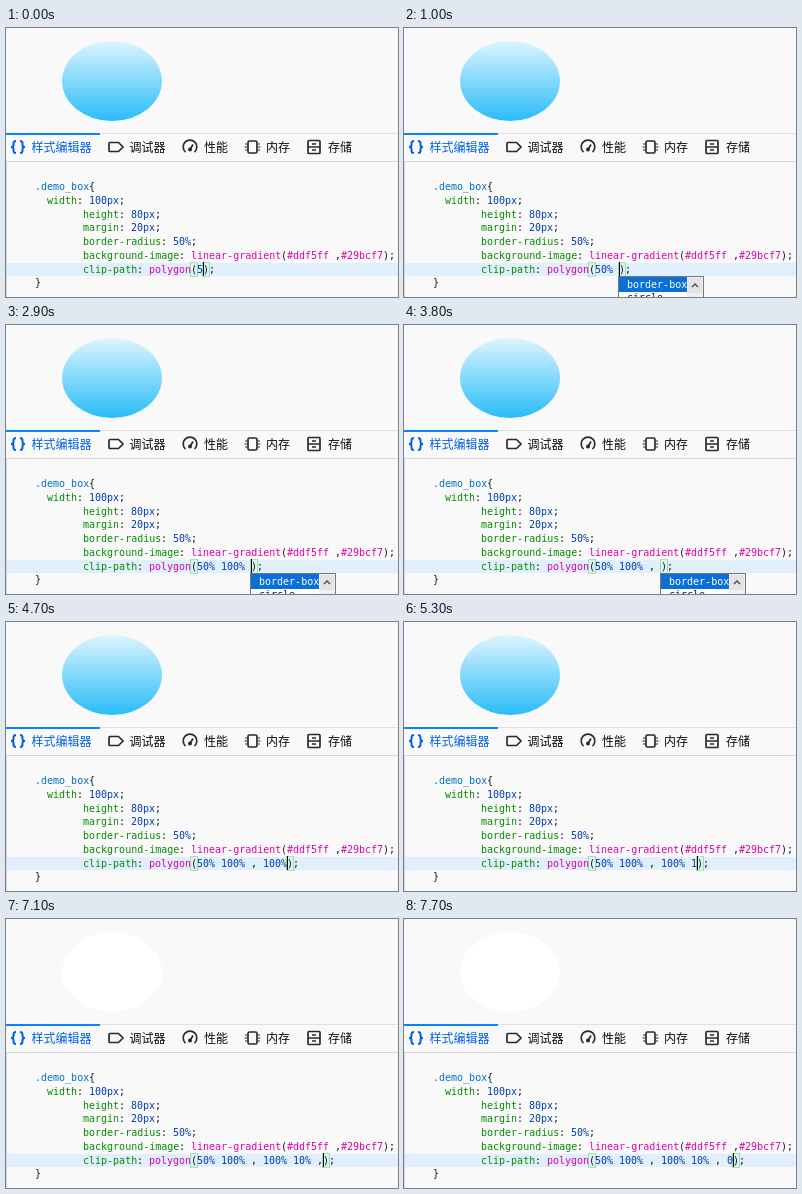
Recreate the animation shown at these times as an HTML page with a canvas. Size 392x269 px, loop 8 s.

```html
<!DOCTYPE html>
<html lang="zh-CN">
<head>
<meta charset="utf-8">
<title>clip-path typing</title>
<style>
html, body { margin: 0; width: 100%; height: 100%; overflow: hidden; background: #f9f9fa; }
canvas { display: block; width: 392px; height: 269px; }
</style>
</head>
<body>
<canvas id="stage" width="392" height="269"></canvas>
<script>
const W = 392, H = 269, LOOP = 8000, CELL = 6, LEFT = 29;
const ctx = document.getElementById('stage').getContext('2d');
const MONO = '10px "DejaVu Sans Mono", monospace';
const UI = '500 12px "Noto Sans CJK SC", "Noto Sans CJK", sans-serif';
const BG = '#f9f9fa', INK = '#18191a', GREEN = '#058b00', PINK = '#dd00a9';
const BLUE = '#0060df', NAVY = '#003eaa', ICON = '#2a2a2e';

const TYPED = '50% 100% , 100% 10% , 0';
// moment at which each character of TYPED appears
const KEYS = [0, 200, 700, 1000, 1500, 1600, 1800, 2500, 2900, 3000, 3300, 4000,
  4200, 4300, 4700, 5100, 5300, 5500, 6200, 6900, 7100, 7500, 7700];
const BLINK = 500, CLIP_AT = 6700;

function rect(x, y, w, h, color) {
  ctx.fillStyle = color;
  ctx.fillRect(x, y, w, h);
}

function text(s, x, y, color, font) {
  ctx.font = font;
  ctx.fillStyle = color;
  ctx.fillText(s, x, y);
}

function stroke(path, color = ICON, width = 1.7) {
  ctx.strokeStyle = color;
  ctx.lineWidth = width;
  ctx.stroke(new Path2D(path));
}

// Draws [text, color] tokens on the character grid.
function codeLine(row, col, tokens) {
  const y = Math.round(162 + row * 13.75);
  for (const [s, color] of tokens) {
    for (const m of s.matchAll(/\S+/g)) {
      text(m[0], LEFT + (col + m.index) * CELL, y, color, MONO);
    }
    col += s.length;
  }
}

function rule(row, col, name, value) {
  codeLine(row, col, [[name, GREEN], [': ', INK], [value, NAVY], [';', INK]]);
}

function ellipse(t) {
  const g = ctx.createLinearGradient(0, 13, 0, 93);
  g.addColorStop(0, '#ddf5ff');
  g.addColorStop(1, '#29bcf7');
  ctx.fillStyle = t < CLIP_AT ? g : '#fff';
  ctx.beginPath();
  ctx.ellipse(106, 53, 50, 40, 0, 0, Math.PI * 2);
  ctx.fill();
}

function toolbar() {
  rect(0, 105, W, 1, '#e0e0e2');
  rect(0, 105, 94, 2, '#0a84ff');
  rect(0, 133, W, 1, '#d7d7db');
  rect(0, 134, 1, H - 134, '#d7d7db');

  // braces
  stroke('M10 113 Q7.5 113 7.5 115.5 V117 Q7.5 119 5 119 Q7.5 119 7.5 121 V122.5 Q7.5 125 10 125' +
    'M14 113 Q16.5 113 16.5 115.5 V117 Q16.5 119 19 119 Q16.5 119 16.5 121 V122.5 Q16.5 125 14 125', BLUE, 2);
  // tag
  stroke('M104 114.5 H112.5 L117 119 L112.5 123.5 H104 Q103 123.5 103 122.5 V115.5 Q103 114.5 104 114.5 Z');
  // gauge
  stroke('M179.5 124 A6.8 6.8 0 1 1 188.5 124 M184 121.5 L187 116.5');
  ctx.beginPath();
  ctx.arc(184, 121.5, 2, 0, Math.PI * 2);
  ctx.fillStyle = ICON;
  ctx.fill();
  // chip
  stroke('M243.5 113 H249.5 Q251 113 251 114.5 V123.5 Q251 125 249.5 125 H243.5 Q242 125 242 123.5' +
    'V114.5 Q242 113 243.5 113 Z');
  stroke('M239 116 H241 M238.5 119 H241 M239 122 H241 M252 116 H254 M252 119 H254.5 M252 122 H254', ICON, 1.2);
  // drawers
  stroke('M303 112.5 H313 Q314 112.5 314 113.5 V124.5 Q314 125.5 313 125.5 H303 Q302 125.5 302 124.5' +
    'V113.5 Q302 112.5 303 112.5 Z M302 119 H314 M306 116 H310 M306 122 H310');

  text('样式编辑器', 25.5, 124, BLUE, UI);
  const tabs = [['调试器', 123.5], ['性能', 198], ['内存', 260], ['存储', 322]];
  for (const [s, x] of tabs) text(s, x, 124, '#0c0c0d', UI);
}

function bracketBox(x) {
  ctx.strokeStyle = 'rgba(0,200,0,.35)';
  ctx.lineWidth = 1;
  ctx.strokeRect(x - 0.5, 234.5, CELL + 1, 14);
}

function popup(x) {
  rect(x - 1, 248, 86, H - 248, '#77777c');
  rect(x, 249, 84, H - 249, '#fff');
  rect(x, 249, 68, 15, '#0a70d8');
  text('border-box', x + 8, 260, '#fff', MONO);
  text('circle', x + 8, 273, INK, MONO);
  rect(x + 68, 249, 16, H - 249, '#f0f0f0');
  rect(x + 69, 250, 14, 15, '#e3e3e5');
  stroke(`M${x + 73} 259 L${x + 76} 256 L${x + 79} 259`, '#505050', 1.5);
}

function editor(t) {
  rect(1, 235, W - 1, 13, '#e1effc');
  codeLine(0, 0, [['.demo_box', '#0072c6'], ['{', INK]]);
  rule(1, 2, 'width', '100px');
  rule(2, 8, 'height', '80px');
  rule(3, 8, 'margin', '20px');
  rule(4, 8, 'border-radius', '50%');
  codeLine(5, 8, [['background-image', GREEN], [': ', INK], ['linear-gradient', PINK], ['(', INK],
    ['#ddf5ff', PINK], [' ,', INK], ['#29bcf7', PINK], [');', INK]]);

  const n = KEYS.filter(k => k <= t).length;
  const typed = TYPED.slice(0, n);
  const args = typed.split(/(,)/).map(s => [s, s === ',' ? INK : NAVY]);
  codeLine(6, 8, [['clip-path', GREEN], [': ', INK], ['polygon', PINK], ['(', INK], ...args, [');', INK]]);
  codeLine(7, 0, [['}', INK]]);

  const caret = 191 + n * CELL;
  bracketBox(185);
  bracketBox(caret);
  if (t - KEYS[n - 1] < BLINK) rect(caret, 234, 1, 14, '#000');
  if (typed.endsWith(' ')) popup(caret);
}

function draw(t) {
  rect(0, 0, W, H, BG);
  ellipse(t);
  toolbar();
  editor(t);
}

const start = performance.now();
function tick() {
  draw((performance.now() - start) % LOOP);
  requestAnimationFrame(tick);
}
tick();
</script>
</body>
</html>
```
